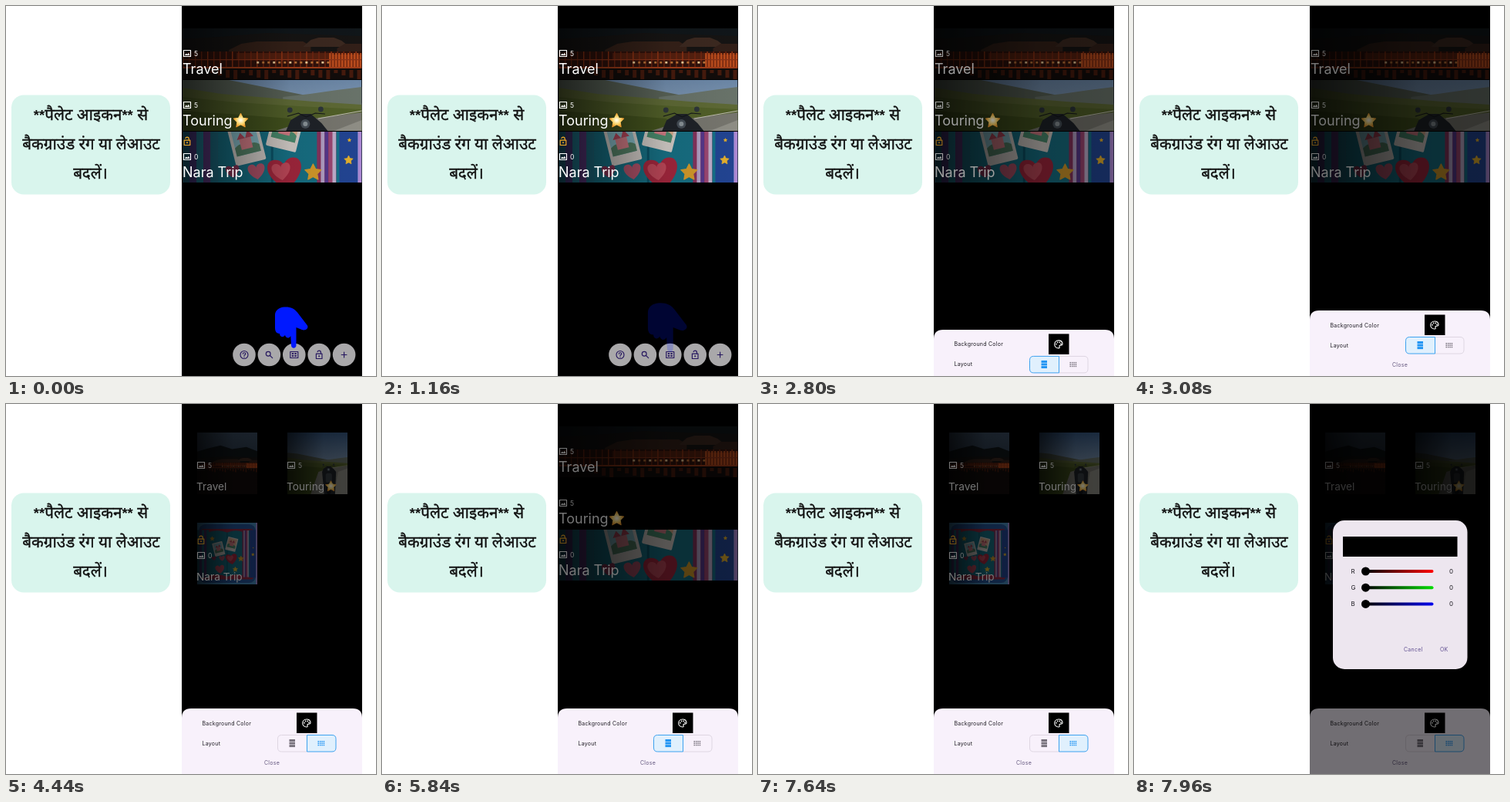
An HTML page for the animation above (8000 ms loop, 480x480 px).

```html
<!DOCTYPE html>
<html lang="hi">
<head>
<meta charset="utf-8">
<title>Palette icon</title>
<style>
html, body { margin: 0; width: 100%; height: 100%; overflow: hidden; background: #fff; }
svg { display: block; }
#stage { width: 480px; height: 480px; font-family: Inter, Roboto, sans-serif; }
.hindi { font: 500 20.7px "Noto Sans Devanagari", "Noto Sans", sans-serif; text-anchor: middle; fill: #111; stroke: #111; stroke-width: .35px; }
.ast { font: 700 18.5px "Liberation Sans", Arial, sans-serif; stroke: none; }
.small { font-size: 7px; letter-spacing: .25px; }
.line { fill: none; stroke-width: 1.15; stroke-linecap: round; stroke-linejoin: round; }
</style>
</head>
<body>
<svg id="stage" viewBox="0 0 480 480"></svg>
<script>
const DURATION = 8000;
const range = (n, f) => Array.from({ length: n }, (_, i) => f(i)).join('');
const rect = (x, y, w, h, fill, more = '') =>
  `<rect x="${x}" y="${y}" width="${w}" height="${h}" fill="${fill}" ${more}/>`;
const circle = (x, y, r, fill, more = '') => `<circle cx="${x}" cy="${y}" r="${r}" fill="${fill}" ${more}/>`;
const path = (d, fill, more = '') => `<path d="${d}" fill="${fill}" ${more}/>`;
const line = (d, color, more = '') => `<path class="line" d="${d}" stroke="${color}" ${more}/>`;
const text = (x, y, s, more = '') => `<text x="${x}" y="${y}" ${more}>${s}</text>`;
const at = (x, y, body) => `<g transform="translate(${x} ${y})">${body}</g>`;

function star(x, y, r, fill) {
  const pts = Array.from({ length: 10 }, (_, i) => {
    const a = i * Math.PI / 5 - Math.PI / 2, d = i % 2 ? r * .5 : r;
    return (x + d * Math.cos(a)).toFixed(2) + ',' + (y + d * Math.sin(a)).toFixed(2);
  });
  return `<polygon points="${pts.join(' ')}" fill="${fill}" stroke="${fill}" stroke-width="${r * .12}" stroke-linejoin="round"/>`;
}

const heart = (x, y, s, fill) =>
  path('M0 10C-14 1-13-10-6-10C-2-10 0-7 0-5C0-7 2-10 6-10C13-10 14 1 0 10Z', fill,
    `transform="translate(${x} ${y}) rotate(-8) scale(${s})"`);

const gradient = (id, a, b, more = '') =>
  `<linearGradient id="${id}" ${more}><stop stop-color="${a}"/><stop offset="1" stop-color="${b}"/></linearGradient>`;
const down = 'x2="0" y2="1"';

// Photo scenes, 232 x 238 units each; the list shows the band from y = 86
const shade = rect(0, 0, 232, 238, 'url(#shade)');

const shrine =
  rect(0, 0, 232, 238, 'url(#dusk)') +
  path('M0 74L40 62L90 50L135 64L190 56L232 72V130H0Z', '#11171b') +
  path('M0 100L60 96L110 92L232 96V122H0Z', '#171514') +
  path('M60 114L76 106L96 103L156 103L166 109V117H60Z', '#38231a') +
  path('M156 110L166 101L176 98H196L206 102L216 110Z', '#3f2b22') +
  path('M200 112L210 106H232V116H200Z', '#35211a') +
  rect(0, 116, 232, 22, '#34130c') +
  rect(70, 118, 162, 8, '#5a2210') +
  range(29, i => rect(i * 8, 116, 1.3, 22, i % 4 ? '#7d2a12' : '#a83c17')) +
  rect(190, 120, 42, 17, '#8f3414') +
  range(11, i => rect(190 + i * 4, 118, 1.5, 21, '#d65a23')) +
  rect(0, 126, 232, 1.3, '#93371a') +
  range(14, i => rect(96 + i * 7, 129, 3, 2.6, i % 3 ? '#c97a3a' : '#ffd9a0')) +
  rect(0, 136, 232, 2, '#a8401b') +
  rect(0, 138, 232, 100, '#130d0b') +
  range(20, i => rect(36 + i * 10, 140, 5, 4 + i % 4 * 3, '#4a1c0e')) +
  shade;

const ride =
  rect(0, 0, 232, 238, 'url(#day)') +
  path('M0 78L40 82L90 92L140 102L190 112L232 116V150H0Z', '#5d675b') +
  path('M130 108L165 104L200 99L232 95V130H130Z', '#6f7a70') +
  path('M0 96L50 104L110 109L170 114L232 118V238H0Z', '#636f38') +
  path('M0 108L70 115L150 120L232 124V238H0Z', '#56652b') +
  path('M0 126L60 130L140 136L160 238H0Z', '#46561f') +
  path('M232 128L170 136L120 152L90 238H232Z', '#7d7c74') +
  path('M232 138L196 152L180 238H232Z', '#97968d') +
  line('M232 126L176 136', '#c9c6ba') +
  path('M134 152L140 138L154 130L166 130L180 142L188 152L184 238H142Z', '#20242a') +
  circle(159, 143, 6, '#48515a') + circle(159, 143, 3, '#8f999f') +
  line('M136 133L150 129L160 134L172 129L184 130', '#14171a', 'stroke-width="2.5"') +
  circle(139, 125, 3.4, '#30383d') + circle(179, 124, 3.4, '#30383d') +
  rect(148, 157, 24, 36, '#3b4147', 'rx="8"') +
  rect(152, 194, 16, 44, '#111417', 'rx="7"') +
  shade;

const polaroid = (x, y, angle, sky, hill) =>
  `<g transform="translate(${x} ${y}) rotate(${angle})">` +
  rect(-20, -27, 40, 52, '#d9d3ce', 'rx="2"') + rect(-16, -23, 32, 36, sky) +
  path('M-16 13V2Q-6-6 2 3Q9-3 16 4V13Z', hill) +
  rect(-8, -8, 15, 14, '#d9808a') + path('M-11-8L-5-16L0-8ZM0-8L5-18L11-8Z', '#b8485c') + '</g>';

const album =
  rect(0, 0, 232, 238, '#4a92c4') +
  rect(6, 6, 220, 226, '#285aa2', 'rx="26"') +
  rect(14, 24, 203, 195, '#9c2c46', 'rx="10"') +
  range(5, i => rect(i * 9, 28, 9, 184, ['#1d5f78', '#4a3a80', '#237f98', '#5c3a80', '#1d6f86'][i])) +
  path('M45 36Q82 24 116 38Q146 24 176 36V204Q146 194 116 208Q82 194 45 204Z', '#187489') +
  path('M116 38V208', 'none', 'stroke="#0c566c" stroke-width="3"') +
  range(6, i => rect(174 + i * 5, 30, 5, 180, ['#8a3560', '#b8a5cc', '#5a3a91', '#a34a78', '#c7b6d6', '#16758f'][i])) +
  rect(203, 28, 24, 184, '#24489a') + rect(227, 0, 5, 238, '#b690df') +
  polaroid(83, 102, -14, '#8ac0cc', '#57856a') +
  polaroid(133, 84, 14, '#dcae8e', '#4c9072') +
  heart(133, 141, 2, '#a8283f') + heart(128, 138, 1.1, '#c44a5c') +
  heart(96, 138, 1, '#b8566e') + heart(65, 138, .8, '#8d3558') +
  heart(88, 180, 1.6, '#c64f64') +
  star(169, 139, 11, '#dca02c') + star(215, 123, 6, '#f0b92f') + star(216, 97, 2.6, '#f0b92f') +
  star(58, 62, 9, '#dca02c') + star(147, 180, 10, '#f0b92f') +
  shade;

// Icons, centred on 0,0
const white = '#fff', ink = '#25165f', amber = '#f3a929';
const photoIcon = line('M-4.5-4H4.5V4H-4.5Z', white) + path('M-3.2 2.6L-1.2 0L.2 1.5L1.8-.7L3.4 2.6Z', white);
const lock = color => line('M-3.8-1.4H3.8V5H-3.8ZM2.2-1.4V-3.2Q2.2-5.4 0-5.4Q-1.8-5.4-2.1-3.8', color) + circle(0, 1.8, 1, color);
const navIcons = [
  `<circle class="line" r="5" stroke="${ink}"/>` + line('M-1.7-1.2Q-1.5-2.8 0-2.8Q1.8-2.8 1.7-1.2Q1.5-.2 0 .7V1.1', ink) + circle(0, 2.9, .7, ink),
  `<circle class="line" cx="-1.2" cy="-1.3" r="2.9" stroke="${ink}"/>` + line('M1.1 1L4.3 4.2', ink, 'stroke-width="1.4"'),
  line('M-5-4H5V4H-5Z', ink) + range(4, i => rect(i % 2 ? .6 : -3, i < 2 ? -2.4 : .5, 2.4, 1.9, ink)),
  lock(ink),
  line('M-3.4 0H3.4M0-3.4V3.4', ink)
];
const nav = navIcons.map((icon, i) =>
  at(309 + i * 32.4, 452.5, circle(0, 0, 14.8, '#a9a8aa') + icon)).join('');

const albums = [
  { id: 'shrine', name: 'Travel', count: 5 },
  { id: 'ride', name: 'Touring', count: 5, starred: true },
  { id: 'album', name: 'Nara Trip', count: 0, locked: true }
];

const photo = (a, x, y, w, h, box) =>
  `<svg class="photo-${a.id}" x="${x}" y="${y}" width="${w}" height="${h}" viewBox="${box}" preserveAspectRatio="none"><use href="#${a.id}"/></svg>`;

const label = (a, x, y, size, iconGap, starX) =>
  (a.locked ? at(x + 6, y - iconGap - 20, lock(amber)) : '') +
  at(x + 6, y - iconGap, photoIcon) +
  text(x + 15, y - iconGap + 3.3, a.count, 'font-size="8.5" fill="#fff"') +
  text(x, y, a.name, `font-size="${size}" fill="#fff"`) +
  (a.starred ? star(x + starX, y - size * .33, size * .53, 'url(#gold)') : '');

const list = albums.map((a, i) => {
  const y = 29 + i * 67;
  return photo(a, 229, y, 232.5, 66, '0 86 232 66') + label(a, 229, y + 59, 18, 26.5, 75.5);
}).join('');

const grid = albums.map((a, i) => {
  const x = 248 + i % 2 * 117, y = 37 + (i > 1 ? 117 : 0);
  return photo(a, x, y, 78, 80, '0 0 232 238') + label(a, x - 1, y + 74.5, 13.7, 32, 57.5);
}).join('');

// Bottom sheet
const palette =
  line('M0-5C-7-5-7 5 0 5C1.6 5 1.2 3.6 1 2.8C.7 1.6 1.5 1.2 2.6 1.2C4.5 1.2 5.2 .4 5-1C4.6-3.5 2.6-5 0-5Z', white) +
  [[-3, -.3], [-1.4, -2.6], [1.3, -2.6], [3, -.6]].map(([x, y]) => circle(x, y, .85, white)).join('');
const half = (right, on) =>
  path(right ? 'M390.5 429.5H423Q428 429.5 428 434.5V446Q428 451 423 451H390.5Z'
    : 'M390.5 429.5H357.5Q352.5 429.5 352.5 434.5V446Q352.5 451 357.5 451H390.5Z',
    on ? '#e0f0fd' : 'none', `stroke="${on ? '#3da2ef' : '#ded6e2'}"`);
const toggle = isGrid => {
  const color = on => on ? '#2094f3' : '#77717c';
  return half(!isGrid, false) + half(isGrid, true) +
    range(3, i => rect(367.5, 435 + i * 3.6, 7.5, 2.9, color(!isGrid))) +
    range(12, i => rect(404.5 + i % 4 * 2.4, 437 + Math.floor(i / 4) * 2.4, 1.5, 1.5, color(isGrid)));
};
const sheet =
  path('M228 480V407Q228 395 240 395H450Q462 395 462 407V480Z', '#f8f1fb') +
  text(254.5, 416.5, 'Background Color', 'class="small" fill="#1c1a20"') +
  text(254.5, 442.5, 'Layout', 'class="small" fill="#1c1a20"') +
  rect(377, 400.5, 26.5, 26.5, '#000') + at(390, 414, palette) +
  `<g id="listToggle">${toggle(false)}</g><g id="gridToggle">${toggle(true)}</g>` +
  text(345, 468, 'Close', 'class="small" text-anchor="middle" fill="#62567d"');

// Colour dialog
const slider = (name, i) => {
  const y = 217 + i * 21.2;
  return text(281.5, y + 3, name, 'font-size="8" fill="#1c1a20"') +
    rect(300, y - 2, 88.5, 4, `url(#ch${name})`, 'rx="2"') + circle(300.5, y, 5.5, '#000') +
    text(409, y + 3, 0, 'font-size="8" fill="#1c1a20"');
};
const dialog =
  rect(258, 151, 174.5, 193, '#ede6ef', 'rx="15"') +
  rect(271, 172, 148.5, 26, '#000') +
  ['R', 'G', 'B'].map(slider).join('') +
  text(350, 320.7, 'Cancel', 'class="small" fill="#604f91"') +
  text(397, 320.7, 'OK', 'class="small" fill="#604f91"');

const hand = path('M349 401C349 395 354 391 361 390.5C369 390 374 392.5 378 397.5L391 414.5C393 418.5 388 421.5 384 420L376.5 417V440C376.5 445 370 445 370 440L369.3 428C367 432 363 431 362 427C359 431 355 429 355 425C350 425 349 421 349 417Z', '#0019ff');

const stage = document.getElementById('stage');
const ast = '<tspan class="ast">**</tspan>';
stage.innerHTML =
  '<defs>' +
  '<linearGradient id="shade"><stop stop-opacity=".66"/><stop offset=".6" stop-opacity=".12"/><stop offset="1" stop-opacity=".06"/></linearGradient>' +
  '<radialGradient id="gold"><stop offset=".1" stop-color="#fffbe0"/><stop offset=".6" stop-color="#fbd36a"/><stop offset="1" stop-color="#ee9a2e"/></radialGradient>' +
  gradient('dusk', '#3d4f64', '#1b2530', down) + gradient('day', '#3c618f', '#cfdde8', down) +
  gradient('chR', '#000', '#f00') + gradient('chG', '#000', '#0d0') + gradient('chB', '#000', '#00e') +
  `<g id="shrine">${shrine}</g><g id="ride">${ride}</g><g id="album">${album}</g>` +
  '<clipPath id="phone"><rect x="228" width="234" height="480"/></clipPath></defs>' +
  rect(0, 0, 480, 480, '#fff') +
  rect(7, 115.5, 206, 129, '#d9f5ed', 'rx="16"') +
  text(110, 148, ast + 'पैलेट आइकन' + ast + ' से', 'class="hindi"') +
  text(110.5, 186, 'बैकग्राउंड रंग या लेआउट', 'class="hindi"') +
  text(109.5, 224, 'बदलें।', 'class="hindi"') +
  '<g clip-path="url(#phone)">' + rect(228, 0, 234, 480, '#000') +
  `<g id="list">${list}</g><g id="grid">${grid}</g>${nav}` +
  rect(228, 0, 234, 480, '#000', 'id="scrim"') +
  `<g id="sheet">${sheet}</g>` +
  `<g id="modal">${rect(228, 0, 234, 480, '#000', 'opacity=".54"')}${dialog}</g></g>` +
  `<g id="hand">${hand}</g>`;

const el = {};
for (const id of ['list', 'grid', 'scrim', 'sheet', 'modal', 'hand', 'listToggle', 'gridToggle'])
  el[id] = document.getElementById(id);
const rides = stage.querySelectorAll('.photo-ride');

const progress = (t, start, length) => Math.min(1, Math.max(0, (t - start) / length));
const show = (node, on) => { node.style.display = on ? '' : 'none'; };
const switches = [4120, 5840, 6760];

function draw(t) {
  const tap = progress(t, 520, 800), scale = 1 + .24 * tap;
  el.hand.setAttribute('transform', `translate(370.3 417.5) scale(${scale}) translate(-370.3 -417.5)`);
  el.hand.setAttribute('opacity', 1 - tap);

  const open = 1 - (1 - progress(t, 2670, 390)) ** 3;
  el.scrim.setAttribute('opacity', .54 * open);
  el.sheet.setAttribute('transform', `translate(0 ${85 * (1 - open)})`);

  const isGrid = switches.filter(s => t >= s).length % 2 === 1;
  show(el.list, !isGrid);
  show(el.grid, isGrid);
  show(el.listToggle, !isGrid);
  show(el.gridToggle, isGrid);
  // The second photo loads a moment after each layout switch
  const loading = switches.some(s => t >= s && t < s + 80);
  rides.forEach(r => show(r, !loading));

  el.modal.setAttribute('opacity', progress(t, 7660, 290));
}

const begin = performance.now();
function tick() {
  draw((performance.now() - begin) % DURATION);
  requestAnimationFrame(tick);
}
tick();
</script>
</body>
</html>
```
